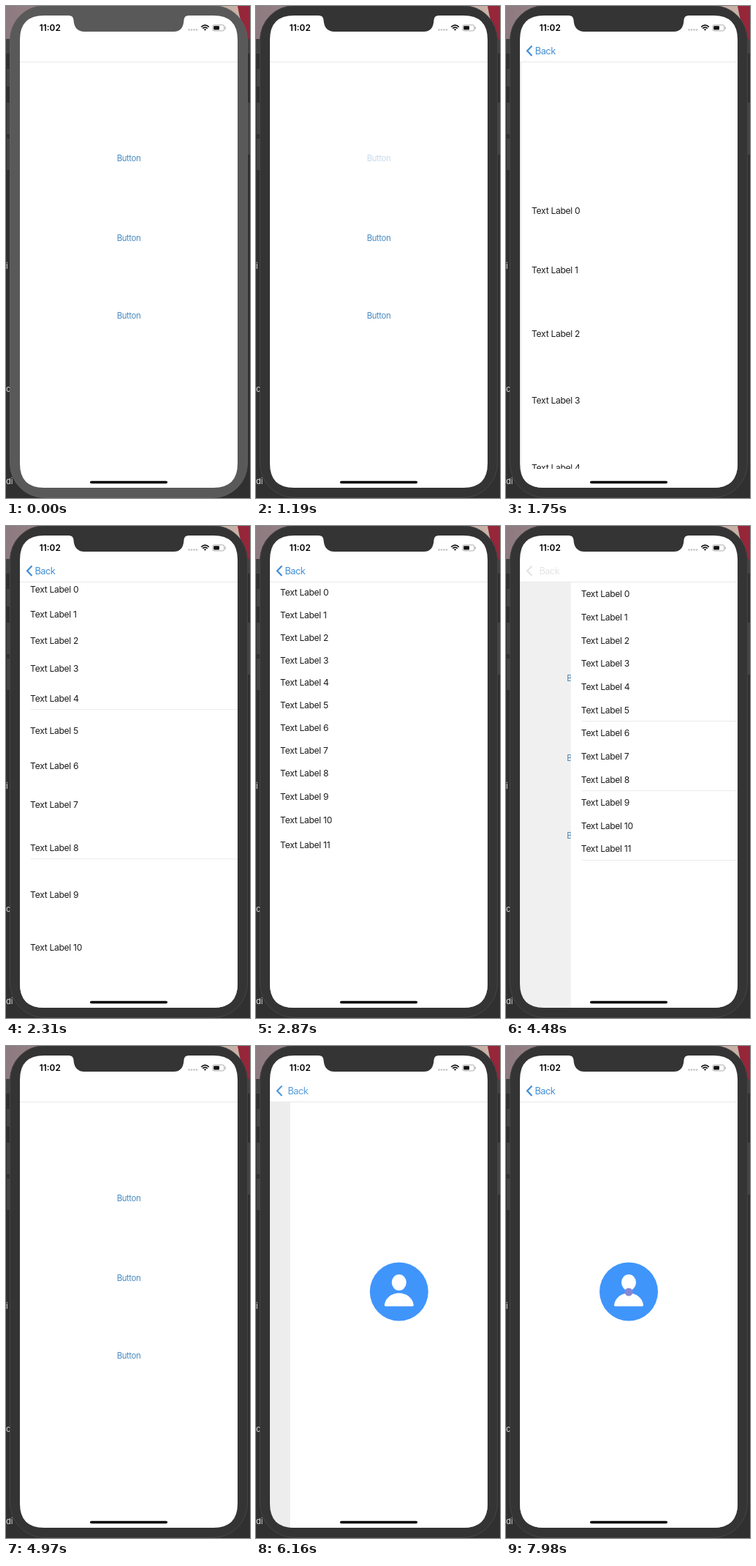
An HTML page for the animation above (8 s loop, 334 px wide and 672 px high).

```html
<!DOCTYPE html>
<html lang="en">
<head>
<meta charset="utf-8">
<title>Animated list</title>
<style>
  html, body { margin: 0; width: 100%; height: 100%; overflow: hidden; background: #303030; }
  svg { display: block; width: 334px; height: 672px; }
  text { font-family: Inter, Roboto, sans-serif; }
  .code { font: 11px "DejaVu Sans Mono", monospace; fill: #ddd; }
  .button { font-size: 11.4px; letter-spacing: -.42px; fill: #4a8cc2; }
  .label { font-size: 12.1px; letter-spacing: -.3px; fill: #1c1c1c; }
  .back { font-size: 12.8px; letter-spacing: -.5px; }
</style>
</head>
<body>
<svg viewBox="0 0 334 672">
  <defs>
    <linearGradient id="wall">
      <stop offset="0" stop-color="#8d7a80"/>
      <stop offset=".85" stop-color="#bfa9a2"/>
      <stop offset="1" stop-color="#cdb8a8"/>
    </linearGradient>
    <clipPath id="glass">
      <path d="M19 46Q19 13 52 13H86Q92 13 92.5 19C93 30 99 35 107 35H230C238 35 243 30 243.500 19Q244 13 250 13H284Q317 13 317 46V625Q317 658 284 658H52Q19 658 19 625Z"/>
    </clipPath>
    <clipPath id="content"><path d="M19 77H317V658H19Z"/></clipPath>
    <clipPath id="safe"><path d="M19 77H317V632H19Z"/></clipPath>
  </defs>

  <path fill="#303030" d="M0 0H334V672H0Z"/>
  <path fill="url(#wall)" d="M0 0H334V45H0Z"/>
  <path fill="#96263a" d="M317 0Q321 25 330 45H334V0Z"/>
  <path fill="#424242" d="M0 45H334V65H0Z"/>
  <path fill="#444" d="M1 86H8V110H1ZM1 132H8V175H1ZM1 181H8V224H1ZM328 132H334V203H328Z"/>
  <g class="code">
    <text x="0" y="359">i</text>
    <text x="0" y="527">c</text>
    <text x="0" y="653">di</text>
  </g>

  <rect id="bezel" x="5.500" y="-.5" width="325" height="672" rx="47" stroke-width="1"/>

  <g clip-path="url(#glass)">
    <path fill="#fff" d="M19 13H317V658H19Z"/>
    <g clip-path="url(#content)">
      <g id="home"></g>
      <path id="dim" d="M19 77H317V658H19Z"/>
      <g id="page">
        <path fill="#fff" d="M19 77H317V658H19Z"/>
        <g id="list" clip-path="url(#safe)"></g>
        <g id="profile">
          <circle cx="168" cy="335.500" r="40" fill="#4095fb"/>
          <g fill="#fff">
            <ellipse cx="168" cy="323" rx="10" ry="11"/>
            <path d="M148 354C149 344 158 337.500 168 337.500S187 344 188 354Q188 355.500 186 355.500H150Q148 355.500 148 354Z"/>
          </g>
          <circle id="dot" cx="168" cy="336" r="5.500" fill="#8a87d2"/>
        </g>
      </g>
    </g>
    <path stroke="#e9e9e9" d="M19 76.500H317"/>
    <g id="back">
      <path d="M35.500 54.500L29 61.200L35.500 68" fill="none" stroke="currentColor" stroke-width="2.200"/>
      <text id="backText" class="back" y="65.600" fill="currentColor">Back</text>
    </g>
    <text x="60.300" y="34" font-size="11.8" font-weight="600" text-anchor="middle">11:02</text>
    <g fill="#c4c4c4">
      <circle cx="250.500" cy="32.500" r="1.300"/><circle cx="254" cy="32.500" r="1.300"/>
      <circle cx="257.500" cy="32.500" r="1.300"/><circle cx="261" cy="32.500" r="1.300"/>
    </g>
    <g fill="none" stroke="#111" stroke-width="1.700">
      <path d="M267.200 28.600Q272.500 23.600 277.800 28.600M269.200 30.700Q272.500 27.700 275.800 30.700"/>
      <path d="M272.500 31.300V33.300" stroke-width="2.200"/>
    </g>
    <rect x="282.900" y="25.900" width="15.800" height="8" rx="2" fill="none" stroke="#999" stroke-width=".8"/>
    <rect x="284.200" y="27.200" width="7.800" height="5.400" rx="1" fill="#111"/>
    <path d="M300.200 28.500V31.500" stroke="#999"/>
    <rect x="115" y="648.700" width="106" height="3.600" rx="1.800"/>
  </g>
</svg>

<script>
const LOOP = 8000, STEP = 70, WIDTH = 298;
const FOCUS = 1120, TAP_1 = 1190, PUSH_1 = 1365, TAP_BACK = 4270, POP = 4430.4;
const TAP_2 = 5740, PUSH_2 = 5945, TOUCH = 7910;
const ROWS = 12, ROW_TOP = 92.9, ROW_HEIGHT = 31.65;
const CELLS_START = 1346, CELL_DELAY = 53.5, CELL_DROP = 554;

const $ = id => document.getElementById(id);
const [bezel, home, dim, page, list, profile, dot, back, backText] =
  ["bezel", "home", "dim", "page", "list", "profile", "dot", "back", "backText"].map($);

function add(parent, tag, attrs, text = "") {
  const el = document.createElementNS("http://www.w3.org/2000/svg", tag);
  for (const name in attrs) el.setAttribute(name, attrs[name]);
  el.textContent = text;
  return parent.appendChild(el);
}

const buttons = [212, 320.5, 427].map(y =>
  add(home, "text", { class: "button", x: 168, y, "text-anchor": "middle" }, "Button"));

const rows = Array.from({ length: ROWS }, (_, i) => {
  const row = add(list, "g", {});
  add(row, "text", { class: "label", x: 33.1, y: 4.4 }, "Text Label " + i);
  const line = add(row, "path", { d: "M34 15.500H317", stroke: "#ebebeb" });
  return { row, line };
});

const show = (el, on) => el.setAttribute("visibility", on ? "inherit" : "hidden");
const move = (el, x, y = 0) => el.setAttribute("transform", `translate(${x} ${y})`);

// Critically damped slide from 1 to 0
function slide(ms) {
  const x = Math.max(0, ms) * 0.0185;
  return (1 + x) * Math.exp(-x);
}

// Underdamped spring from 1 to 0, damping ratio 0.8
function spring(ms) {
  const x = Math.max(0, ms) * 0.00485;
  return Math.exp(-0.8 * x) * (Math.cos(0.6 * x) + Math.sin(0.6 * x) / 0.75);
}

// Page offset: 1 is off to the right, 0 is fully in
function pageOffset(t) {
  const q = t < POP ? slide(t - PUSH_1)
    : t < PUSH_2 ? 1 - slide(t - POP)
    : slide(t - PUSH_2);
  return q > 0.995 ? 1 : q < 0.002 ? 0 : q;
}

function drawRows(t) {
  rows.forEach(({ row, line }, i) => {
    const age = t - CELLS_START - i * CELL_DELAY;
    const drop = age > 1800 ? 0 : CELL_DROP * spring(age);
    const y = ROW_TOP + i * ROW_HEIGHT + drop;
    move(row, 0, y);
    // Hairlines only survive near whole pixels, and not while overshooting
    show(line, drop >= 0 && y - Math.floor(y) < 0.18);
  });
}

function drawBack(t, q) {
  const popping = t >= POP && t < PUSH_2;
  const pressed = t >= TAP_BACK && t < POP;
  back.setAttribute("color", popping ? "#d8d8d8" : "#438fd6");
  back.setAttribute("opacity", pressed ? 0.25 : popping ? Math.max(0, 1 - 1.3 * q) : 1 - q);
  backText.setAttribute("x", 39.5 + Math.min(6, 42 * q));
}

function draw(t) {
  const q = pageOffset(t), focused = t >= FOCUS;
  bezel.setAttribute("fill", focused ? "#343434" : "#595959");
  bezel.setAttribute("stroke", focused ? "#454545" : "#606060");

  move(home, -0.3 * WIDTH * (1 - q));
  move(page, q * WIDTH);
  dim.setAttribute("opacity", 0.078 * (1 - q));
  buttons[0].setAttribute("opacity", t >= TAP_1 && t < PUSH_1 ? 0.3 : 1);
  buttons[1].setAttribute("opacity", t >= TAP_2 && t < PUSH_2 ? 0.3 : 1);

  show(list, t < PUSH_2);
  show(profile, t >= PUSH_2);
  show(dot, t >= TOUCH);
  drawRows(t);
  drawBack(t, q);
}

const start = performance.now();
function tick() {
  const t = (performance.now() - start) % LOOP;
  draw(Math.floor(t / STEP) * STEP);
  requestAnimationFrame(tick);
}
tick();
</script>
</body>
</html>
```
